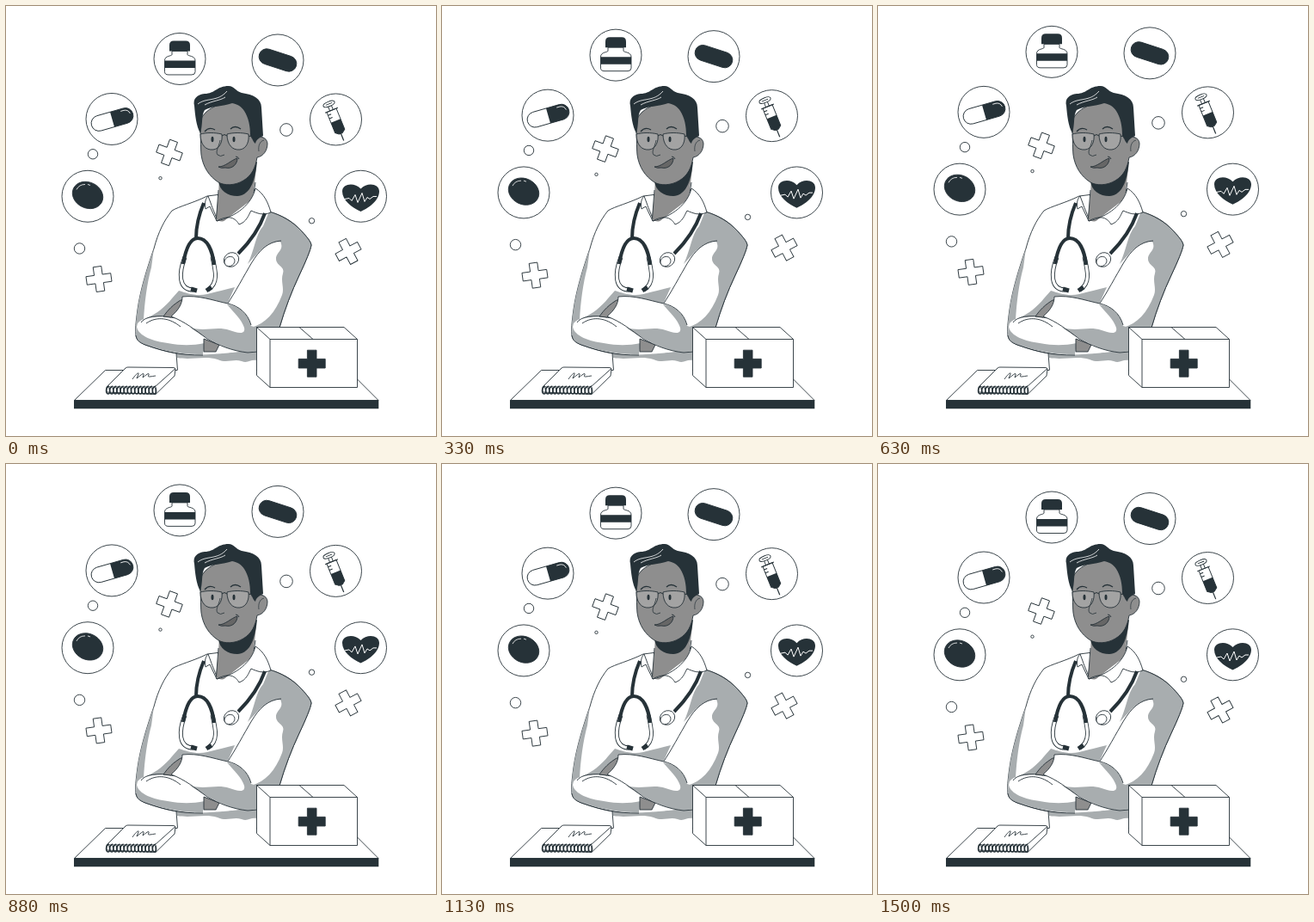
These frames come from a looping animation (500 by 500 pixels, 1.54 s). An HTML page with a canvas:

```html
<!DOCTYPE html>
<html lang="en">
<head>
<meta charset="utf-8">
<title>Doctor</title>
<style>
html, body { margin: 0; width: 100%; height: 100%; overflow: hidden; background: #fff; }
canvas { display: block; width: 500px; height: 500px; }
</style>
</head>
<body>
<canvas id="stage" width="500" height="500"></canvas>
<script>
const ctx = document.getElementById('stage').getContext('2d');
const INK = '#263238', SKIN = '#8e8e8e', SHADE = '#a8adaf', WHITE = '#fff';
const LOOP = 1540, FPS = 24, STEPS = 37, RISE = 10;

function shape(d, fill, stroke = INK, width = 0.9) {
  const path = new Path2D(d);
  if (fill) { ctx.fillStyle = fill; ctx.fill(path); }
  if (stroke) { ctx.strokeStyle = stroke; ctx.lineWidth = width; ctx.stroke(path); }
}
const line = (d, width = 0.9, color = INK) => shape(d, null, color, width);
const solid = (d, fill = INK) => shape(d, fill, null);

function oval(x, y, rx, ry = rx, fill = WHITE, stroke = INK, turn = 0) {
  ctx.beginPath();
  ctx.ellipse(x, y, rx, ry, turn, 0, Math.PI * 2);
  if (fill) { ctx.fillStyle = fill; ctx.fill(); }
  if (stroke) { ctx.strokeStyle = stroke; ctx.lineWidth = 0.9; ctx.stroke(); }
}

function at(x, y, degrees, draw) {
  ctx.save();
  ctx.translate(x, y);
  ctx.rotate(degrees * Math.PI / 180);
  draw();
  ctx.restore();
}

function plus(x, y, degrees, fill, arm, half) {
  const long = arm - half;
  at(x, y, degrees, () => shape(
    `M${-half} ${-arm}h${2 * half}v${long}h${long}v${2 * half}h${-long}v${long}` +
    `h${-2 * half}v${-long}h${-long}v${-2 * half}h${long}z`, fill));
}

function desk() {
  shape('M115.5 423.5H398L433 458.5H79.5Z', WHITE);
  solid('M79 458.3H433.3V468.3H79Z');
}

function notebook() {
  shape('M117 443L139 421Q140 420 142 420L194 420.5Q197 420.5 197 422L196 430L174 451.5L117 449Z', WHITE);
  line('M117 443L173 443L197 421.5M174 443V451');
  line('M147 434C151 428 155 425 154 428L152 433C156 430 161 425 160 429L159 432' +
    'C162 430 167 425 166 429C164 432 167 431 174 430');
  for (let i = 0; i < 14; i++) {
    line(`M${120 + i * 4.15} 442c-5 2 -4 9 -1 9c2 0 2 -4 1 -7`, 1.4);
  }
}

function firstAidBox() {
  shape('M291.5 373.5H393L408.5 387.5V443.5H307L291.5 429.5Z', WHITE);
  line('M291.5 373.5L307 387.5H408.5M307 387.5V443.5M341 373.5L357 387.5');
  plus(355.7, 415.7, 0, INK, 15.5, 5.3);
}

function coat() {
  shape('M199 424V400L230 300H291V424', WHITE, null);
  shape('M234 221C218 229 201 233 193 238C184 249 177 263 172 282C164 305 156 331 153 353' +
    'C151 367 150 378 151 383C152 389 155 391 162 394C187 403 215 408 236 407L281 402L318 374' +
    'C324 353 332 332 341 313C349 296 354 284 355 278C354 273 350 269 344 262C332 249 320 243 305 239L290 214Z', WHITE);
  solid('M198 404C215 407 240 406 291 400V412C284 411 281 416 274 413C264 410 257 416 246 411C231 406 218 412 199 409Z', SHADE);
  line('M198 404L199.5 423.5');

  // shaded sleeve
  solid('M306 239C320 243 334 251 344 262C350 269 354 273 355 278C354 284 349 296 341 313' +
    'C332 332 324 353 318 374H285C302 369 313 357 321 336C324 328 319 320 322 311' +
    'C325 303 314 302 314 294C314 286 324 284 319 274' +
    'C310 273 300 279 293 287L281 300C289 284 290 266 299 256Z', SHADE);
  line('M306 239C320 243 334 251 344 262C350 269 354 273 355 278C354 284 349 296 341 313C332 332 324 353 318 374');
  line('M320 273C304 274 294 285 286 298C277 313 266 334 257 347');

  // outer edge of the other sleeve, and the fold above the crossed arms
  solid('M172 282C164 305 156 331 153 353C151 367 150 378 151 383L160 365' +
    'C161 345 164 322 169 304Z', SHADE);
  solid('M163 363C175 358 185 350 193 340L201 331C210 334 222 338 234 335' +
    'C246 332 257 329 266 327L257 347L205 340L186 361Z', SHADE);
}

function arms() {
  shape('M153 369C158 362 172 361 192 361C207 365 222 376 232 387L229 405' +
    'C203 406 174 399 156 391C149 387 151 377 153 369Z', WHITE, null);
  solid('M152 373C154 384 172 390 188 392C204 395 216 395 231 392L229 405C203 406 174 399 156 391C149 387 151 380 152 373Z', SHADE);
  line('M151 383C152 389 155 391 162 394C187 403 203 406 229 406M157 368C161 361 178 359 192 362M163 369C176 360 191 363 203 373');
  shape('M230 387L248 394L244 402L230 402Z', SKIN);
  shape('M183 361C188 354 194 347 205 341L211 352L199 363Z', SKIN);
  shape('M205 338C224 336 239 342 258 346C272 350 281 358 285 374H292V401L281 403' +
    'C263 401 248 395 234 387C219 376 208 367 192 361C200 354 205 347 205 338Z', WHITE, null);
  solid('M214 374C232 379 245 372 260 377C268 380 279 383 277 374C274 364 265 357 257 347' +
    'C271 349 281 357 285 372L292 374V401L281 403C261 401 241 392 214 374Z', SHADE);
  line('M292 402L281 403C263 401 248 395 234 387C219 376 208 367 192 361C200 354 205 347 205 338' +
    'C224 336 239 342 258 346C271 349 281 357 285 371');
}

function neck() {
  solid('M248 199L247 220L244 247C248 251 252 252 256 248L287 224L291 188Z', SKIN);
  line('M247 214L244.5 247M290 205L288 218');
  solid('M247 203C248 215 258 221 269 221C281 220 289 210 292 181Z');
  shape('M235 221C231 225 231 231 232 236L237 233L245 250C245 244 240 236 238 229Z', WHITE);
  shape('M290 212C300 218 305 229 308 240C299 244 292 241 285 238C282 243 280 251 271 254' +
    'C267 247 260 242 245 250C268 245 286 230 290 212Z', WHITE);
}

function head() {
  shape('M225 137C228 121 247 112 265 112C279 116 285 129 286 154' +
    'C294 149 304 153 304 160C304 168 299 175 292 176C290 188 286 197 276 203' +
    'C266 209 254 209 247 205C236 198 229 187 227 173C226 163 227 150 225 137Z', SKIN);
  line('M300 156C295 157 293 163 294 169', 0.7);
  solid('M226 148C221 139 220 127 219 116C217 108 222 103 231 102C243 102 245 93 259 93' +
    'C265 93 267 99 274 101C288 103 297 108 297 118L299 151C295 153 291 155 290 160' +
    'C286 157 287 153 284 151C284 139 282 130 277 122C274 117 269 114 263 113' +
    'C252 117 239 116 231 121C227 127 229 138 226 148Z');
  line('M223 114C233 106 246 112 257 99M231 115C240 110 249 110 255 106', 0.8, WHITE);
  const lens = 'c7 -2 17 -2 25 0c1 8 -2 17 -10 18c-9 1 -15 -6 -15 -18z';
  shape('M226 149' + lens, '#a3a3a3', INK, 0.9);
  shape('M257 149' + lens, '#a3a3a3', INK, 0.9);
  line('M251 151Q254 148 257 151M282 151L290 153', 1);
  oval(240, 155, 1.5, 3.3, INK, null);
  oval(265, 155, 1.5, 3.3, INK, null);
  line('M231 146Q236 140 243 144M261 143Q266 138 273 143', 1.4);
  line('M249 156C248 163 243 169 246 173Q249 176 254 173', 0.8);
  shape('M247 187C255 187 262 179 269 177C269 184 263 190 255 188Q250 189 247 187Z', '#666');
  line('M267 175Q270 175 271 178');
}

function stethoscope() {
  line('M230 229C224 243 221 255 221 270M301 241C295 258 285 273 270 288', 4);
  const tubes = 'M208 292C201 310 200 330 218 330M240 292C244 309 247 322 235 330';
  line(tubes, 5);
  line(tubes, 3.3, WHITE);
  line('M206 300C209 282 214 270 223 270C234 270 240 284 242 301', 4.2);
  line('M215 329L222 331M239 327L233 331', 5);
  oval(262, 295, 9, 8, WHITE, INK, -0.6);
  oval(260, 297, 6.2, 5.4, WHITE, INK, -0.6);
}

function bottle() {
  shape('M193 53H211V57C211 59 220 58 220 64V77Q220 80.5 216 80.5H189Q184.5 80.5 184.5 77V64C184.5 58 193 59 193 57Z', WHITE);
  solid('M190 53V46Q190 41 195 41H209Q214 41 214 46V53Z');
  solid('M184.5 64H220V72.5H184.5Z');
}

function capsule(length, height, fill) {
  ctx.beginPath();
  ctx.roundRect(-length / 2, -height / 2, length, height, height / 2);
  ctx.fillStyle = fill;
  ctx.fill();
  ctx.strokeStyle = INK;
  ctx.lineWidth = 0.9;
  ctx.stroke();
}

function pill() {
  capsule(50, 18, WHITE);
  solid('M0 -9H16A9 9 0 0 1 16 9H0Z');
  line('M12 -6.5H16Q21 -6 22 -1', 0.8, WHITE);
}

function syringe() {
  line('M0 16V26', 1.2);
  shape('M-2 -18H2V-9H-2Z', WHITE);
  oval(0, -20, 7, 2.8);
  line('M-4 -20H4');
  shape('M-6 -12H6V14L2 17H-2L-6 14Z', WHITE);
  solid('M-6 1H6V14L2 17H-2L-6 14Z');
  line('M-8 -12H8M-6 -8H-2M-6 -4H-2', 1);
}

function heart() {
  solid('M412.5 239.5C402 235 391 226 391 216C391 207 405 205 412.5 213C420 205 434 207 434 216C434 226 423 235 412.5 239.5Z');
  line('M394 225L399 224L402 227L406 220L409 229L414 218L417 228L420 223L423 225L427 222H431', 1, WHITE);
}

function tablet() {
  oval(95, 220.5, 18.3, 15, INK, INK, 0.45);
  line('M82 214Q85 208 92 208M95 208L98 209', 0.8, WHITE);
}

function floaters() {
  [[202, 62], [316, 63.5], [123, 132], [383.5, 132.5], [412.5, 221.8], [95, 221.8]]
    .forEach(([x, y]) => oval(x, y, 30));
  [[326, 144.5, 7.3], [101, 172.8, 5.7], [85.5, 282.5, 6.2], [179.5, 200.7, 1.7], [355.5, 250.3, 3.2]]
    .forEach(([x, y, r]) => oval(x, y, r));
  plus(190, 171, 20, WHITE, 14.5, 4.8);
  plus(108, 318, -8, WHITE, 14.5, 4.8);
  plus(398, 286, -28, WHITE, 14.5, 4.8);
  bottle();
  at(316, 63.5, 18, () => capsule(45, 18, INK));
  at(123.5, 132.5, -16, pill);
  at(383, 133, -22, syringe);
  heart();
  tablet();
}

function drawScene(time) {
  const step = Math.min(STEPS - 1, Math.floor((time + 4) * FPS / 1000));
  const phase = (step + 1) / STEPS;
  const lift = 2 * RISE * Math.min(phase, 1 - phase);
  ctx.fillStyle = WHITE;
  ctx.fillRect(0, 0, 500, 500);
  desk();
  coat();
  neck();
  head();
  stethoscope();
  arms();
  notebook();
  firstAidBox();
  at(0, -lift, 0, floaters);
}

ctx.lineJoin = 'round';
const start = performance.now();
function tick() {
  drawScene((performance.now() - start) % LOOP);
  requestAnimationFrame(tick);
}
tick();
</script>
</body>
</html>
```
